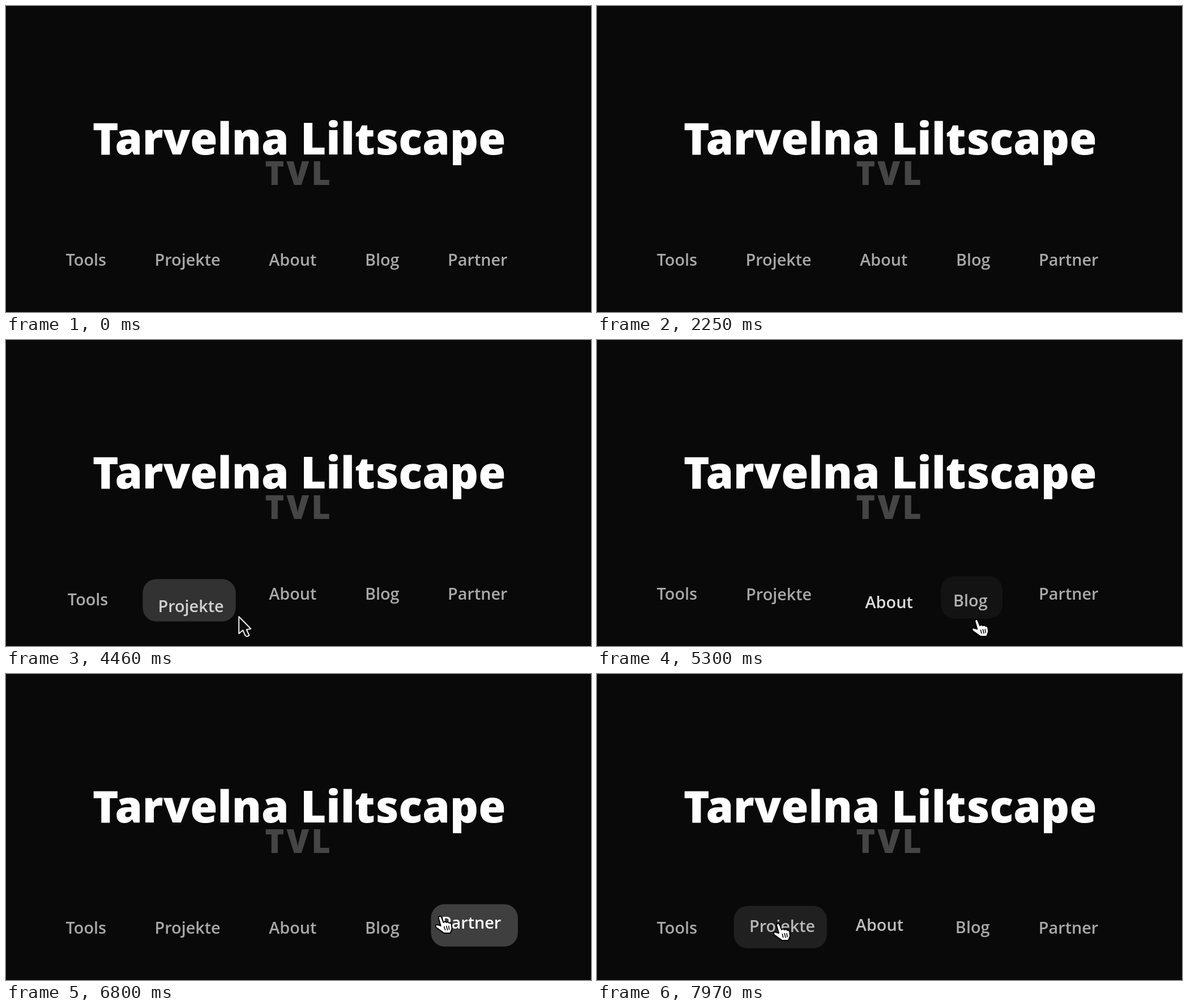
Animation of 1033 by 542 pixels, one loop 8000 ms. Source, as an HTML page with a canvas:

```html
<!DOCTYPE html>
<html lang="de">
<head>
<meta charset="utf-8">
<title>Magnetic menu</title>
<style>
  html, body { margin: 0; width: 100%; height: 100%; overflow: hidden; background: #090909; }
  canvas { display: block; }
</style>
</head>
<body>
<canvas id="stage" width="1033" height="542"></canvas>
<script>
const ctx = document.getElementById('stage').getContext('2d');
const LOOP = 8000, STEP = 5;
const FAMILY = '"Open Sans", sans-serif';
const LABEL_FONT = '600 28.8px';
const MENU = { left: 81.5, right: 909.5, y: 450, padding: 24, height: 75 };
const LABELS = ['Tools', 'Projekte', 'About', 'Blog', 'Partner'];

// The pointer's turning points: time, x, y
const TURNS = [
  [2750, 40, 560], [3020, 92, 474], [3200, 92, 506], [3460, 118, 503],
  [3850, 150, 476], [4060, 178, 506], [4240, 290, 484], [4460, 411, 490],
  [5200, 608, 484], [5300, 669, 495], [6200, 880, 460], [6800, 766, 429],
  [7840, 402, 441], [7970, 319, 442]
];

const ARROW = new Path2D('M0 0V30L7 24L11 33Q14 37 18 33L13.5 23L21 21.5Z');
const HAND = new Path2D('M-2 3Q-1 -2 3 1L7 11Q9 8 12 11Q15 9 17 12Q20 11 21 14L22 22L19 30H8L-6 20Q-9 15 -4 15L2 17Z');
const KNUCKLES = new Path2D('M8 18L10 25M12 17L14 25M16 17L17 24');

const clamp = v => Math.max(0, Math.min(1, v));
const smooth = v => v * v * (3 - 2 * v);
const mix = (a, b, k) => a + (b - a) * k;

// Pills are spread with equal gaps, like justify-content: space-between.
function layoutMenu() {
  ctx.font = `${LABEL_FONT} ${FAMILY}`;
  const widths = LABELS.map(label => ctx.measureText(label).width + 2 * MENU.padding);
  const total = widths.reduce((sum, width) => sum + width);
  const gap = (MENU.right - MENU.left - total) / (LABELS.length - 1);
  let left = MENU.left;
  return LABELS.map((label, i) => {
    const x = left + widths[i] / 2;
    left += widths[i] + gap;
    return { label, x, width: widths[i] };
  });
}
const layout = layoutMenu();

function pointerAt(t) {
  if (t < TURNS[0][0]) return null;
  const found = TURNS.findIndex(turn => turn[0] > t);
  const next = found < 0 ? TURNS.length - 1 : found;
  const [t0, x0, y0] = TURNS[next - 1], [t1, x1, y1] = TURNS[next];
  const k = clamp((t - t0) / (t1 - t0));
  return { x: mix(x0, x1, k), y: mix(y0, y1, k) };
}

// The label follows the pointer, its pill follows by half as much.
function advance(item, pointer) {
  const dx = pointer.x - item.x, dy = pointer.y - MENU.y;
  item.hover = Math.abs(dx - item.pos.x / 2) < item.width / 2 &&
               Math.abs(dy - item.pos.y / 2) < MENU.height / 2 + 3;
  const goal = item.hover ? { x: 40 * dx / item.width, y: 0.65 * dy } : { x: 0, y: 0 };
  const rate = 1 - Math.exp(-STEP / (item.hover ? 65 : 180));
  for (const axis of ['x', 'y']) {
    item.lag[axis] = mix(item.lag[axis], goal[axis], rate);
    item.pos[axis] = mix(item.pos[axis], item.lag[axis], rate);
  }
  const direction = item.hover ? STEP : -STEP;
  item.pill = clamp(item.pill + direction / 180);
  item.glow = clamp(item.glow + direction / 500);
}

// Replays the pointer from its entrance, so the state depends on time alone.
function menuAt(time) {
  const items = layout.map(place => ({
    ...place, hover: false, pill: 0, glow: 0, lag: { x: 0, y: 0 }, pos: { x: 0, y: 0 }
  }));
  for (let t = TURNS[0][0]; t <= time; t += STEP) {
    const pointer = pointerAt(t);
    items.forEach(item => advance(item, pointer));
  }
  return items;
}

function text(string, x, y, font, color, spacing = '0px') {
  ctx.font = `${font} ${FAMILY}`;
  ctx.letterSpacing = spacing;
  ctx.fillStyle = color;
  ctx.fillText(string, x, y);
}

function drawItem({ label, x, width, pos, pill, glow }) {
  ctx.fillStyle = `rgba(255,255,255,${0.22 * pill ** 3})`;
  ctx.beginPath();
  ctx.roundRect(x + (pos.x - width) / 2, MENU.y + (pos.y - MENU.height) / 2,
    width, MENU.height, 24);
  ctx.fill();
  const shade = mix(168, 255, smooth(glow));
  text(label, x + pos.x, MENU.y + 10 + pos.y, LABEL_FONT, `rgb(${shade},${shade},${shade})`);
}

function drawPointer({ x, y }, isHand) {
  const shape = isHand ? HAND : ARROW;
  ctx.save();
  ctx.translate(x, y);
  ctx.lineJoin = 'round';
  ctx.lineWidth = 2;
  ctx.fillStyle = isHand ? '#fff' : '#0a0a0a';
  ctx.strokeStyle = isHand ? '#000' : '#f0f0f0';
  ctx.fill(shape);
  ctx.stroke(shape);
  if (isHand) {
    ctx.lineWidth = 1.5;
    ctx.stroke(KNUCKLES);
  }
  ctx.restore();
}

function draw(time) {
  ctx.fillStyle = '#090909';
  ctx.fillRect(0, 0, 1033, 542);
  ctx.textAlign = 'center';
  text('TVL', 517, 317, '800 57.6px', '#454545', '4px');
  text('Tarvelna Liltscape', 517.5, 263, '800 78px', '#fff');
  const items = menuAt(time);
  items.forEach(drawItem);
  const pointer = pointerAt(time);
  if (pointer) drawPointer(pointer, items.some(item => item.hover));
}

function frame() {
  draw(performance.now() % LOOP);
  requestAnimationFrame(frame);
}
frame();
</script>
</body>
</html>
```
